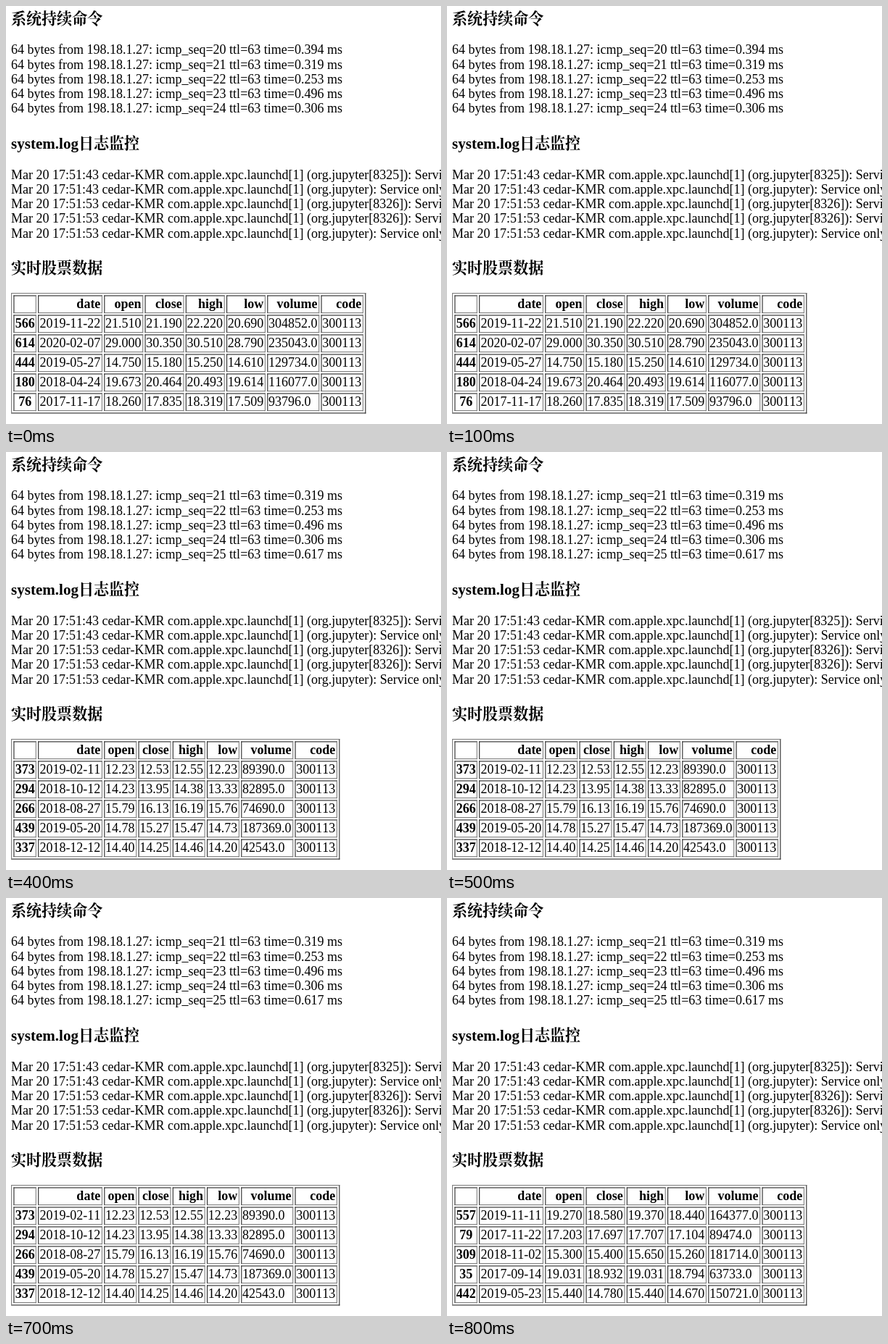
An HTML page for the animation above (0.9 s loop, 600 by 577 pixels).

```html
<!DOCTYPE html>
<html lang="zh-CN">
<head>
<meta charset="utf-8">
<title>实时监控</title>
<style>
  html, body { margin: 0; width: 100%; height: 100%; overflow: hidden; background: #fff; }
  #stage { position: relative; width: 100%; height: 100%; overflow: hidden; contain: strict; }
  #page {
    position: absolute; left: 6.75px; top: 0; width: 527px;
    transform: scale(1.125); transform-origin: 0 0;
    font: 16px/18px "Liberation Serif", "Noto Serif CJK SC", "Noto Sans CJK SC", "Noto Sans CJK", serif;
    font-kerning: none; color: #000;
  }
  section { box-sizing: border-box; height: 153px; padding-top: 4.9px; }
  h3 { margin: 0 0 18.8px; font-size: 18.72px; line-height: 21px; }
  #ping, #log { white-space: pre; }
  thead tr { text-align: right; }
  table { position: relative; top: .9px; }
</style>
</head>
<body>
<div id="stage">
  <div id="page">
    <section><h3>系统持续命令</h3><div id="ping"></div></section>
    <section><h3>system.log日志监控</h3><div id="log"></div></section>
    <section><h3>实时股票数据</h3><table border="1"><thead></thead><tbody></tbody></table></section>
  </div>
</div>
<script>
const LOOP = 900;
const PING_CHANGE = 400;
const pingTimes = ["0.394", "0.319", "0.253", "0.496", "0.306", "0.617"];
const columns = ["", "date", "open", "close", "high", "low", "volume", "code"];

// Row: index, date, open, close, high, low, volume
const quotes = [
  { from: 0, rows: [
    "566 2019-11-22 21.510 21.190 22.220 20.690 304852.0",
    "614 2020-02-07 29.000 30.350 30.510 28.790 235043.0",
    "444 2019-05-27 14.750 15.180 15.250 14.610 129734.0",
    "180 2018-04-24 19.673 20.464 20.493 19.614 116077.0",
    "76 2017-11-17 18.260 17.835 18.319 17.509 93796.0"] },
  { from: 200, rows: [
    "373 2019-02-11 12.23 12.53 12.55 12.23 89390.0",
    "294 2018-10-12 14.23 13.95 14.38 13.33 82895.0",
    "266 2018-08-27 15.79 16.13 16.19 15.76 74690.0",
    "439 2019-05-20 14.78 15.27 15.47 14.73 187369.0",
    "337 2018-12-12 14.40 14.25 14.46 14.20 42543.0"] },
  { from: 800, rows: [
    "557 2019-11-11 19.270 18.580 19.370 18.440 164377.0",
    "79 2017-11-22 17.203 17.697 17.707 17.104 89474.0",
    "309 2018-11-02 15.300 15.400 15.650 15.260 181714.0",
    "35 2017-09-14 19.031 18.932 19.031 18.794 63733.0",
    "442 2019-05-23 15.440 14.780 15.440 14.670 150721.0"] }
];

const find = selector => document.querySelector(selector);
const cell = (tag, text) => `<${tag}>${text}</${tag}>`;

const pingLine = (time, i) =>
  `64 bytes from 198.18.1.27: icmp_seq=${20 + i} ttl=63 time=${time} ms`;

const logLine = (second, job, message) =>
  `Mar 20 17:51:${second} cedar-KMR com.apple.xpc.launchd[1] (org.jupyter${job}): Service ${message}`;

const quoteRow = row => {
  const [index, ...values] = row.split(" ");
  const cells = [...values, "300113"].map(value => cell("td", value));
  return cell("tr", cell("th", index) + cells.join(""));
};

const exited = "exited with abnormal code: 1";
const respawn = "only ran for 0 seconds. Pushing respawn out by 10 seconds.";
find("#log").textContent = [
  logLine(43, "[8325]", exited),
  logLine(43, "", respawn),
  logLine(53, "[8326]", exited),
  logLine(53, "[8326]", exited),
  logLine(53, "", respawn)
].join("\n");
find("thead").innerHTML = cell("tr", columns.map(name => cell("th", name)).join(""));

let shownPing, shownQuote;

function draw(now) {
  const t = now % LOOP;
  const firstPing = t < PING_CHANGE ? 0 : 1;
  const quote = quotes.findLast(q => t >= q.from);
  if (firstPing !== shownPing) {
    find("#ping").textContent =
      pingTimes.map(pingLine).slice(firstPing, firstPing + 5).join("\n");
    shownPing = firstPing;
  }
  if (quote !== shownQuote) {
    find("tbody").innerHTML = quote.rows.map(quoteRow).join("");
    shownQuote = quote;
  }
}

let start;
function tick(now) {
  start ??= now;
  draw(now - start);
  requestAnimationFrame(tick);
}
draw(0);
requestAnimationFrame(tick);
</script>
</body>
</html>
```
